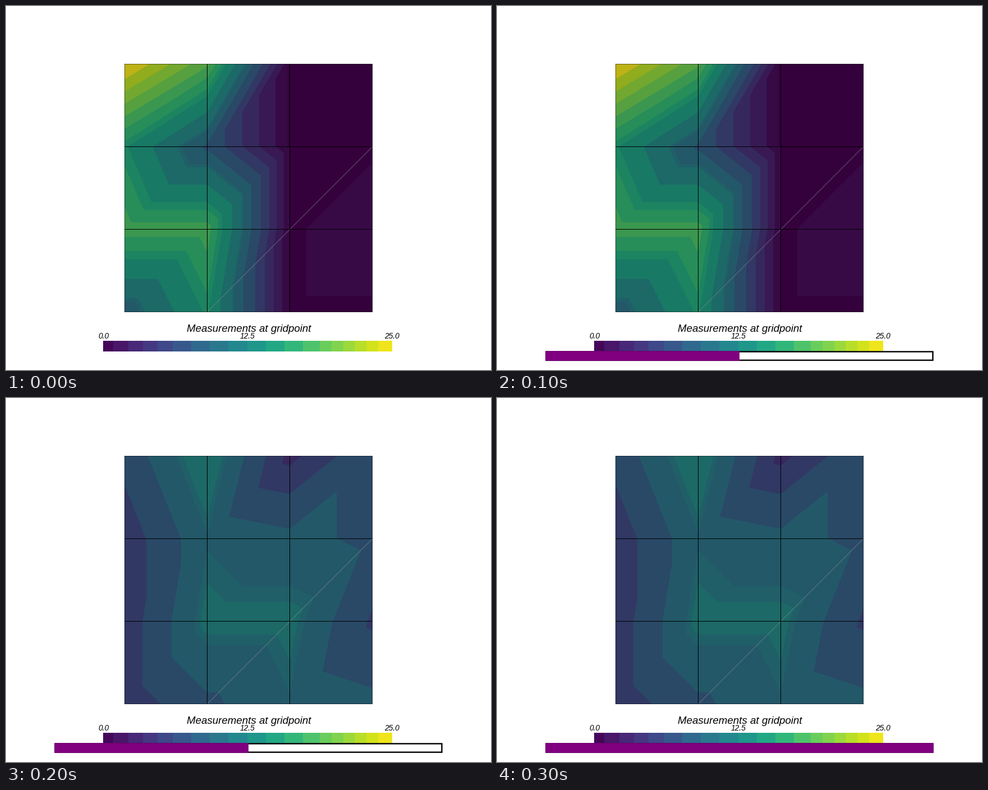
Recreate the animation shown at these times as a matplotlib script. Size 864 by 648 pixels, loop 400 ms.

```python
import numpy as np
import matplotlib.pyplot as plt
from matplotlib.animation import FuncAnimation
from matplotlib.patches import Rectangle

W, H, DPI = 864, 648, 100
PX = 72 / DPI  # one pixel in points
TOP = 25       # upper end of the colour scale
LEFT, RIGHT, UPPER, LOWER = 211, 653, 103, 545
BAR_LEFT, BAR_RIGHT = 173, 688

# Measurements on the 4 x 4 grid, top row first
BEFORE = [[25, 19, 0, 0], [15, 8, 0, 0], [18, 18, 0, 1], [9, 15, 0, 0]]
AFTER = [[7, 12, 4, 8], [5, 10, 9, 8], [5, 11, 11, 6], [5, 8, 10, 9]]

span = np.linspace
viridis = plt.get_cmap("viridis")

# Colour bands: wide in the blues and teals, narrower at both ends
levels = np.sort(np.r_[-0.2, 0.2, span(1.4, 4.6, 3), span(6.33, 14.75, 5),
                       10.15, span(15.7, 23.2, 6), 26])
bar_edges = np.r_[BAR_LEFT, span(191, 297, 5), span(330, 529, 7),
                  span(559, 663, 6), BAR_RIGHT]

xs = span(LEFT, RIGHT, 4)
ys = span(UPPER, LOWER, 4)

fig = plt.figure(figsize=(W / DPI, H / DPI), dpi=DPI, facecolor="white")
ax = fig.add_axes([0, 0, 1, 1])


def middles(edges):
    return (edges[:-1] + edges[1:]) / 2


def box(x0, y0, x1, y1, color, z=2):
    return ax.add_patch(Rectangle((x0, y0), x1 - x0, y1 - y0, fc=color,
                                  ec="none", lw=0, zorder=z, snap=False))


def line(x, y, color="black", width=1.0, alpha=1.0):
    ax.plot(x, y, color=color, lw=width * PX, alpha=alpha, zorder=3,
            solid_capstyle="butt", snap=False)


def label(x, y, text, size):
    ax.text(x, y, text, ha="center", va="baseline", fontsize=size * PX,
            family="Liberation Sans", style="italic", color="black", zorder=4)


def triangles():
    corners = [4 * r + c for r in range(3) for c in range(3)]
    return [t for a in corners
            for t in ((a, a + 1, a + 4), (a + 1, a + 5, a + 4))]


def surface(values):
    gx, gy = np.meshgrid(xs, ys)
    lit = viridis(middles(levels) / TOP)[:, :3] * (0.78, 0.775, 0.73)
    return ax.tricontourf(gx.ravel(), gy.ravel(), triangles(),
                          np.ravel(values).astype(float), levels=levels,
                          colors=lit, antialiased=False, zorder=1)


before, after = surface(BEFORE), surface(AFTER)

# Mesh edges, each on the centre of its pixel row or column
line([xs[1], xs[3]], [ys[3], ys[1]], "#8c9494", 0.7, 0.8)
for k in range(4):
    inner = k in (1, 2)
    x = min(int(xs[k]), RIGHT - 1) + 0.5
    y = min(int(ys[k]), LOWER - 1) + 0.5
    line([x, x], [UPPER, LOWER], alpha=1 if inner else 0.45)
    line([LEFT, RIGHT], [y, y], alpha=1 if inner else 0.45)

# Colour scale
for a, b, mid in zip(bar_edges, bar_edges[1:], middles(bar_edges)):
    box(round(a), 596, round(b), 615,
        viridis((mid - BAR_LEFT) / (BAR_RIGHT - BAR_LEFT)))
label(432.5, 579.5, "Measurements at gridpoint", 18.8)
for part in (0, 0.5, 1):
    label(BAR_LEFT + 0.5 + part * (BAR_RIGHT - BAR_LEFT - 1), 591.5,
          f"{part * TOP:.1f}", 13.8)

# Progress bar
x0, x1, y0, y1 = 0.1 * W, 0.9 * W, 614.2, 631.8
rim = box(x0, y0, x1, y1, "black", 5)
trough = box(x0 + 2.4, y0 + 2.4, x1 - 2.4, y1 - 2.4, "white", 6)
fill = box(x0, y0, x0, y1, "purple", 7)

ax.set_xlim(0, W)
ax.set_ylim(H, 0)
ax.axis("off")


def update(i):
    before.set_visible(i < 2)
    after.set_visible(i >= 2)
    for part in (rim, trough, fill):
        part.set_visible(i > 0)
    fill.set_width((x1 - x0) * ((i + 1) // 2) / 2)
    return []


anim = FuncAnimation(fig, update, frames=4, interval=100, repeat=True,
                     repeat_delay=0, init_func=lambda: update(0), blit=False)
plt.show()
```
